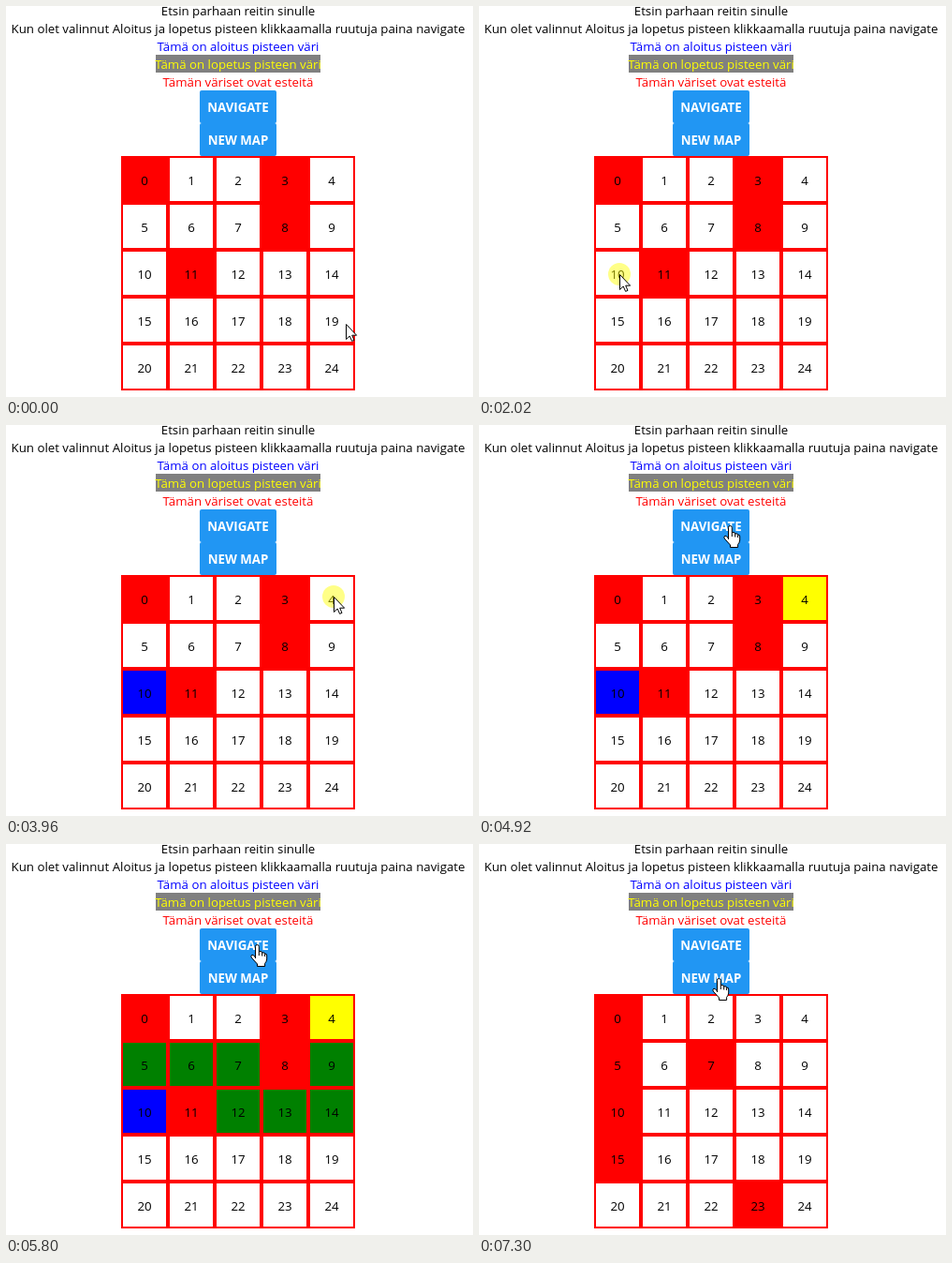
Animation, 499 px wide and 417 px high, one loop 7.46 s. Source, as an HTML page with a canvas:

```html
<!DOCTYPE html>
<html lang="fi">
<head>
<meta charset="utf-8">
<title>Reitinhaku</title>
<style>
  html, body { margin: 0; width: 100%; height: 100%; overflow: hidden; background: #fff; }
  canvas { display: block; }
</style>
</head>
<body>
<canvas id="stage" width="499" height="417"></canvas>
<script>
const ctx = document.getElementById('stage').getContext('2d');
const LOOP = 7460, TICK = 78;
const FONT = '13.27px "Open Sans", "Noto Sans", sans-serif';
const BOLD = 'bold 13.3px "Open Sans", "Noto Sans", sans-serif';
const CENTER = 248, LINE = 19;
const GRID = { x: 123, y: 160, cell: 50, border: 2, size: 5 };

const LINES = [
  ['Etsin parhaan reitin sinulle', '#000'],
  ['Kun olet valinnut Aloitus ja lopetus pisteen klikkaamalla ruutuja paina navigate', '#000'],
  ['Tämä on aloitus pisteen väri', '#00f'],
  ['Tämä on lopetus pisteen väri', '#ff0'],
  ['Tämän väriset ovat esteitä', '#f00'],
];

// Each move starts where the previous one ended; bend bows the path sideways.
const HOME = { x: 363, y: 339 };
const MOVES = [
  { from: 70, to: 740, x: 208, y: 190, ease: 0.85 },
  { from: 820, to: 1290, x: 138, y: 241, ease: 1.75, bend: 2 },
  { from: 1450, to: 1680, x: 150, y: 286, bend: -8 },
  { from: 2250, to: 2810, x: 340, y: 223 },
  { from: 2870, to: 2950, x: 350, y: 209 },
  { from: 3030, to: 3350, x: 350, y: 183, bend: 9 },
  { from: 4200, to: 4360, x: 368, y: 172 },
  { from: 4440, to: 4920, x: 268, y: 107, ease: 0.85 },
  { from: 6180, to: 6580, x: 256, y: 143 },
];

const BUTTONS = [
  { label: 'NAVIGATE', y: 90, press: 5320, release: 5800 },
  { label: 'NEW MAP', y: 125, press: 6980, release: 7300 },
];
const CLICKS = [2020, 3960, ...BUTTONS.map(button => button.press)];
const START = 10, GOAL = 4;
const START_AT = 2250, GOAL_AT = 4200, ROUTE_AT = 5560, NEW_MAP_AT = 7140;
const WALLS = [0, 3, 8, 11], NEW_WALLS = [0, 5, 7, 10, 15, 23];
const ROUTE = findRoute();

const arrow = new Path2D('M.5 .5V16.5L4.2 13L6.6 18.4L9 17.4L6.7 12.2H11.6Z');
const hand = new Path2D('M5.5 15V2.3A1.9 1.8 0 0 1 9.3 2.3V7.6Q12.7 6.6 12.7 9Q15.6 8 15.6 10.2' +
  'Q18 9.6 17.7 12V16Q17.4 18.5 15.6 20.5V23.5H7.5V21L1.2 14Q.2 11.7 2 11.2Q3.6 11 5.5 14Z');
const knuckles = new Path2D('M9.3 7.6V12M12.7 9V12.5M15.6 10.2V13');

function neighbours(i) {
  const n = GRID.size, column = i % n, list = [];
  if (i >= n) list.push(i - n);
  if (column < n - 1) list.push(i + 1);
  if (i < n * (n - 1)) list.push(i + n);
  if (column > 0) list.push(i - 1);
  return list;
}

// Breadth-first search; returns the cells strictly between start and goal.
function findRoute() {
  const cameFrom = new Map([[START, null]]);
  for (const cell of cameFrom.keys()) {
    for (const next of neighbours(cell)) {
      if (!cameFrom.has(next) && !WALLS.includes(next)) cameFrom.set(next, cell);
    }
  }
  const route = [];
  for (let i = cameFrom.get(GOAL); i !== START; i = cameFrom.get(i)) route.push(i);
  return route;
}

function pointerAt(t) {
  const index = MOVES.findLastIndex(move => t >= move.from);
  if (index < 0) return HOME;
  const { from, to, x, y, bend = 0, ease = 1 } = MOVES[index];
  const start = MOVES[index - 1] || HOME;
  const gaps = Math.round((to - from) / TICK);
  const passed = Math.floor((t - from) / (to - from) * gaps + 0.05);
  const p = Math.min(1, (passed + 1) / (gaps + 1)) ** ease;
  const dx = x - start.x, dy = y - start.y;
  const bow = bend * Math.sin(Math.PI * p) / Math.hypot(dx, dy);
  return {
    x: Math.round(start.x + dx * p - dy * bow),
    y: Math.round(start.y + dy * p + dx * bow),
  };
}

function cellColor(i, t) {
  const renewed = t >= NEW_MAP_AT;
  if ((renewed ? NEW_WALLS : WALLS).includes(i)) return '#f00';
  if (renewed) return '#fff';
  if (i === START && t >= START_AT) return '#00f';
  if (i === GOAL && t >= GOAL_AT) return '#ff0';
  if (t >= ROUTE_AT && ROUTE.includes(i)) return '#008000';
  return '#fff';
}

function label(text, x, y, color, font = FONT) {
  ctx.font = font;
  ctx.fillStyle = color;
  ctx.fillText(text, x, y);
}

function drawHeader() {
  ctx.fillStyle = '#808080';
  ctx.fillRect(160, 52, 176, LINE);
  LINES.forEach(([text, color], i) => label(text, CENTER, 10 + LINE * i, color));
}

function drawButton({ label: text, y, press, release }, t) {
  ctx.save();
  if (t >= press && t < release) {
    const elapsed = Math.floor((t - press) / TICK) * TICK;
    const p = Math.min(1, elapsed / (release - press));
    ctx.globalAlpha = 1 - 0.7 * Math.sin(Math.PI * p ** 0.6);
  }
  ctx.fillStyle = '#2196f3';
  ctx.beginPath();
  ctx.roundRect(207, y, 82, 35, 2);
  ctx.fill();
  label(text, CENTER, y + 23, '#fff', BOLD);
  ctx.restore();
}

function drawGrid(t) {
  const { x, y, cell, border, size } = GRID;
  ctx.fillStyle = '#f00';
  ctx.fillRect(x, y, cell * size, cell * size);
  for (let i = 0; i < size * size; i++) {
    const left = x + i % size * cell, top = y + Math.floor(i / size) * cell;
    ctx.fillStyle = cellColor(i, t);
    ctx.fillRect(left + border, top + border, cell - 2 * border, cell - 2 * border);
    label(i, left + cell / 2, top + 31, '#000');
  }
}

function drawPointer(t) {
  const { x, y } = pointerAt(t);
  if (CLICKS.some(click => t >= click && t < click + TICK)) {
    ctx.fillStyle = 'rgba(255, 255, 0, .47)';
    ctx.beginPath();
    ctx.arc(x, y, 12, 0, 2 * Math.PI);
    ctx.fill();
  }
  const overButton = x >= 207 && x < 289 && y >= 90 && y < 160;
  const shape = overButton ? hand : arrow;
  ctx.save();
  ctx.translate(overButton ? x - 7 : x, y);
  ctx.fillStyle = '#fff';
  ctx.strokeStyle = '#000';
  ctx.fill(shape);
  ctx.stroke(shape);
  if (overButton) ctx.stroke(knuckles);
  ctx.restore();
}

function render() {
  const t = performance.now() % LOOP;
  ctx.fillStyle = '#fff';
  ctx.fillRect(0, 0, 499, 417);
  ctx.textAlign = 'center';
  drawHeader();
  BUTTONS.forEach(button => drawButton(button, t));
  drawGrid(t);
  drawPointer(t);
  requestAnimationFrame(render);
}
render();
</script>
</body>
</html>
```
